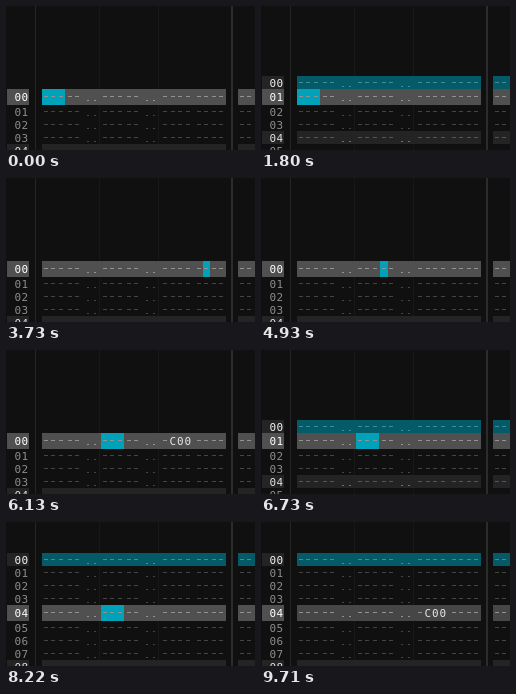
These frames come from a looping animation (249x144 px, 9.73 s). An HTML page:

```html
<!DOCTYPE html>
<html lang="en">
<head>
<meta charset="utf-8">
<title>Pattern editor</title>
<style>
  html, body { margin: 0; width: 100%; height: 100%; overflow: hidden; background: #101010; }
  svg { display: block; width: 100vw; height: 100vh; }
  rect, path { shape-rendering: crispEdges; }
  text { font: 11px "DejaVu Sans Mono", monospace; }
</style>
</head>
<body>
<svg id="stage" viewBox="0 0 249 144"></svg>
<script>
const LOOP = 9730;
const CELL = 7.5, ROW_H = 13, TOP = 83, CURSOR_H = 16;
const NOTE_1 = 36, NOTE_2 = 95, FX_1 = 155.5, FX_2 = 189;

// Each event changes part of the editor state from its time on.
const events = [
  [0, { row: 0, x: NOTE_1, w: 22.5, fx: 0, fade: 0 }],
  [600, { fx: FX_1 }],
  [1050, { fx: 0 }],
  [1200, { row: 1 }],
  [1500, { fx: FX_1 }],
  [1800, { fx: 0 }],
  [1950, { x: 67.5, w: CELL }],
  [2090, { x: 85 }],
  [2240, { x: 119 }],
  [2390, { x: 144 }],
  [2530, { x: 170.5 }],
  [2680, { x: FX_2 }],
  [2980, { x: FX_2 + CELL }],
  [3280, { fx: FX_2 }],
  [3580, { fx: 0 }],
  [3730, { row: 0 }],
  [4030, { fx: FX_2 }],
  [4180, { fx: 0 }],
  [4330, { x: FX_2 }],
  [4630, { x: 170.5 }],
  [4780, { x: 144 }],
  [4930, { x: 119 }],
  [5230, { x: NOTE_2, w: 22.5 }],
  [5530, { fx: FX_1 }],
  [5830, { fx: 0 }],
  [6130, { fx: FX_1 }],
  [6430, { fx: 0 }],
  [6730, { row: 1 }],
  [6870, { row: 2 }],
  [7020, { row: 3 }],
  [7320, { fx: FX_1 }],
  [7470, { fx: 0 }],
  [7770, { fx: FX_1 }],
  [7920, { fx: 0 }],
  [8220, { row: 4 }],
  [8520, { fx: FX_1 }],
  [9120, { fade: 0.2 }],
  [9270, { fade: 0.4 }],
  [9420, { fade: 0.6 }],
  [9560, { fade: 0.8 }],
  [9710, { fade: 1 }]
];

const run = (x, n) => Array.from({ length: n }, (_, i) => x + i * CELL);
const noteCells = x => [...run(x, 3), ...run(x + 24, 2)];
const dashes = [...noteCells(NOTE_1), ...noteCells(NOTE_2), ...run(FX_1, 4), ...run(FX_2, 4), ...run(232, 3)];
const dots = [...run(78, 2), ...run(137, 2)];

const rect = (x, y, w, h, fill, opacity = 1) =>
  `<rect x="${x}" y="${y}" width="${w}" height="${h}" fill="${fill}" opacity="${opacity}"/>`;
const text = (xs, y, fill, str) =>
  `<text x="${xs.map(x => x + 0.5).join(" ")}" y="${y}" fill="${fill}">${str}</text>`;
const strokes = (xs, y, w, color) =>
  `<path d="${xs.map(x => `M${Math.round(x + (CELL - w) / 2)} ${y}h${w}`).join("")}" stroke="${color}"/>`;

function rowStyle(row, s) {
  if (row === s.row) {
    const g = Math.round(80 - 10 * s.fade);
    return { bar: `rgb(${g},${g},${g})`, box: "#505050", num: "#fff", dash: "#929292" };
  }
  if (row === 0) return { bar: "#045a66", box: "#242424", num: "#f0f0f0", dash: "#3f8f9a" };
  if (row % 4 === 0) return { bar: "#242424", box: "#242424", num: "#e0e0e0", dash: "#555", dot: "#77703a" };
  return { num: "#8c8c8c", dash: "#444" };
}

function drawRow(row, s) {
  const current = row === s.row;
  const y = TOP + (row - s.row) * ROW_H + (row > s.row ? CURSOR_H - ROW_H : 0);
  const h = current ? CURSOR_H : ROW_H;
  const base = y + (current ? 12 : 11);
  const c = rowStyle(row, s);
  let out = "";
  if (c.bar) out += rect(1, y, 22, h, c.box) + rect(36, y, 184, h, c.bar) + rect(232, y, 17, h, c.bar);
  if (current) out += rect(s.x, y, s.w, h, "#00a2ba", 1 - s.fade);

  const value = current && s.fx ? run(s.fx + CELL, 3) : [];
  out += strokes(dashes.filter(x => !value.includes(x)), base - 4.5, 4, c.dash);
  out += strokes(dots, base - 0.5, 2, c.dot || c.dash);
  out += text([8, 15], base, c.num, String(row).padStart(2, "0"));
  if (value.length) out += text(value, base, "#e6e6e6", "C00");
  return out;
}

function draw(s) {
  let out = rect(0, 0, 249, 144, "#101010") +
    rect(29, 0, 1, 144, "#262626") + rect(225, 0, 2, 144, "#2c2c2c") +
    rect(93, 0, 1, 144, "#181818") + rect(152, 0, 1, 144, "#181818");
  for (let row = 0; row <= s.row + 4; row++) out += drawRow(row, s);
  stage.innerHTML = out;
}

const stage = document.getElementById("stage");
let shown = -1;

function tick() {
  const t = performance.now() % LOOP;
  const count = events.filter(e => e[0] <= t).length;
  if (count !== shown) {
    shown = count;
    draw(Object.assign({}, ...events.slice(0, count).map(e => e[1])));
  }
  requestAnimationFrame(tick);
}
tick();
</script>
</body>
</html>
```
